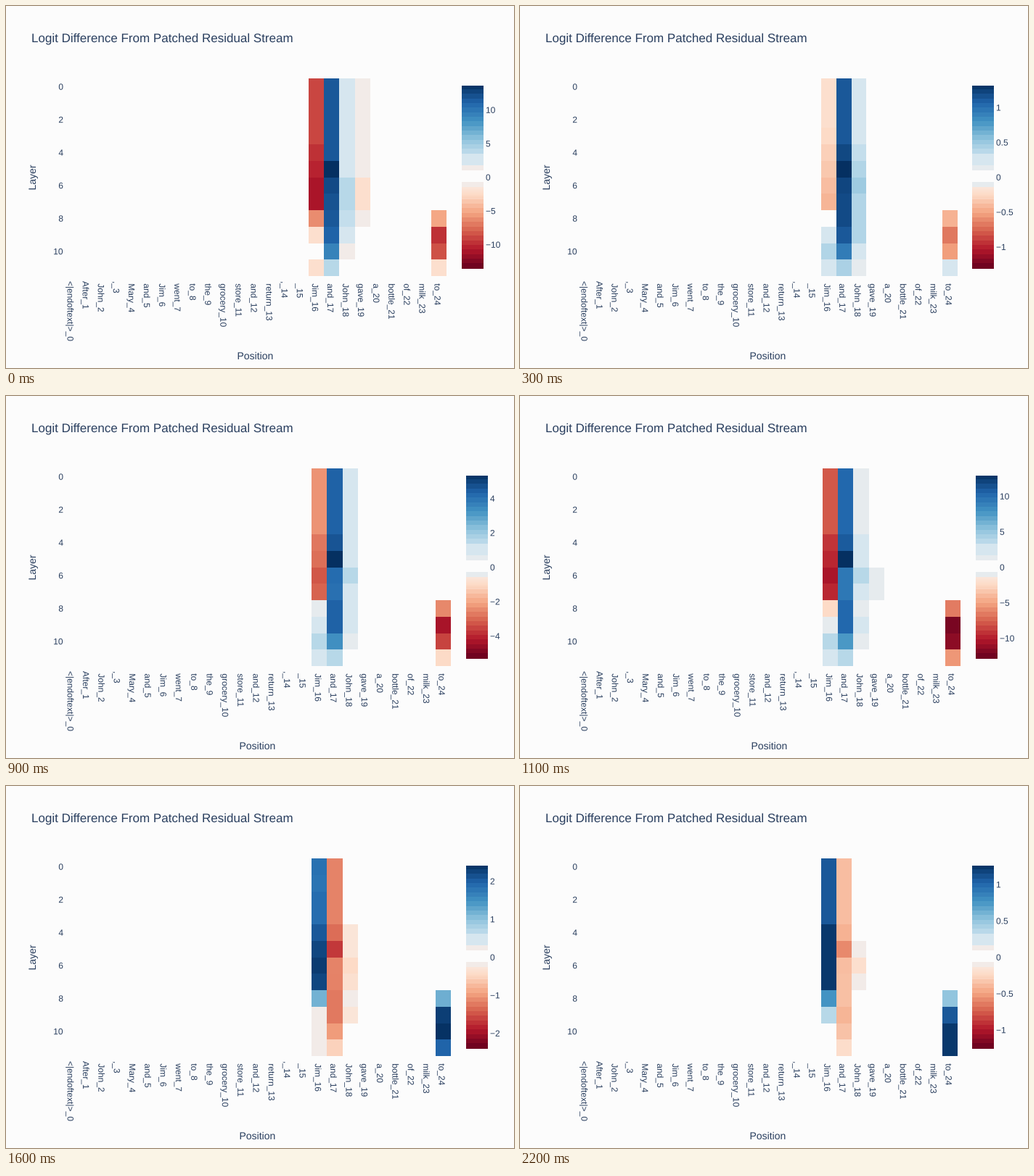
Write a matplotlib script that moves like this. It is 700 px wide and 500 px high and loops after 2.3 s.

```python
import math

import numpy as np
import matplotlib.pyplot as plt
from matplotlib.animation import FuncAnimation
from matplotlib.colors import LinearSegmentedColormap
from matplotlib.patches import PathPatch
from matplotlib.textpath import TextPath
from matplotlib.transforms import Affine2D

W, H, DPI = 700, 500, 100
STEPS, INTERVAL = 23, 100
PAPER = np.array([252, 252, 252])
INK = "#2a3f5f"
PALE_BLUE = np.array([214, 230, 239])
PINKISH, GREYISH = (242, 235, 232), (230, 235, 238)
LEFT, TOP, BOTTOM = 80, 100, 373
BAR_TOP, BAR_BOTTOM = 110, 363
BAR_MID = (BAR_TOP + BAR_BOTTOM) / 2
ROW_H = (BOTTOM - TOP) / 12
COLS = (16, 17, 18, 19, 24)
TOKENS = ["<|endoftext|>", "After", " John", ",", " Mary", " and", " Jim",
          " went", " to", " the", " grocery", " store", " and", " return",
          ",", " ", " Jim", " and", " John", " gave", " a", " bottle",
          " of", " milk", " to"]

RDBU = LinearSegmentedColormap.from_list("rdbu", [
    "#67001f", "#b2182b", "#d6604d", "#f4a582", "#fddbc7", "#f7f7f7",
    "#d1e5f0", "#92c5de", "#4393c3", "#2166ac", "#053061"], N=1001)

poses = []


def pose(at, span, faint, jim, and_, john, to, gave=12 * [0]):
    """Key state: step, colour range, tint near zero, columns in -1..1."""
    grid = np.array([jim, and_, john, gave, 8 * [0] + to], float)
    poses.append((at, math.log(span), np.array(faint, float), grid))


pose(0, 13.6, PINKISH,
     jim=4 * [-.67] + [-.73, -.77, -.82, -.82, -.47, -.17, 0, -.17],
     and_=5 * [.85] + [1, .9, .87, .85, .81, .67, .28],
     john=6 * [.17] + [.28, .28, .24, .17, -.1, 0],
     gave=6 * [-.1] + [-.17, -.17, -.1, 0, 0, 0],
     to=[-.39, -.73, -.64, -.17])
pose(3, 1.314, GREYISH,
     jim=3 * [-.17] + [-.2, -.24, -.27, -.31, -.34, 0, .2, .3, .18],
     and_=4 * [.85] + [.91, 1, .92, .9, .9, .85, .7, .32],
     john=4 * [.18] + [.24, .3, .36, .3, .3, .3, .18, .1],
     to=[-.35, -.53, -.42, .18])
pose(6, 1.413, GREYISH,
     jim=4 * [-.2] + [-.25, -.25, -.33, -.33, .1, .17, .28, .1],
     and_=4 * [.85] + [.9, 1, .85, .8, .85, .85, .67, .28],
     john=6 * [.17] + [.28, .17, .17, .17, .1, 0],
     to=[-.43, -.64, -.35, .17])
pose(11, 12.9, GREYISH,
     jim=4 * [-.62] + [-.72, -.76, -.82, -.76, -.2, .1, .28, .17],
     and_=4 * [.79] + [.84, 1, .72, .72, .79, .79, .58, .28],
     john=4 * [.1] + [.17, .17, .28, .17, .1, .17, .1, 0],
     gave=6 * [0] + [.1, .1] + 4 * [0],
     to=[-.52, -.95, -.9, -.44])
pose(14, 3.547, PINKISH,
     jim=[.67, .67, .7, .7, .8, .85, .93, .85, .4, 0, -.15, -.15],
     and_=4 * [-.56] + [-.64, -.79, -.56, -.56, -.62, -.62, -.47, -.25],
     john=4 * [0] + [-.15, -.15, -.23, -.15, -.15, -.15, -.1, -.1],
     to=[.52, 1, 1, .72])
pose(18, 1.636, PINKISH,
     jim=[.83, .8, .83, .83, .9, .98, .98, .98, .55, .2, 0, 0],
     and_=4 * [-.43] + [-.48, -.63, -.43, -.44, -.43, -.43, -.38, -.21],
     john=4 * [0] + [-.1, -.1, -.17, -.17, 0, -.1, 0, 0],
     to=[.46, .89, .98, .89])
pose(22, 1.259, PINKISH,
     jim=4 * [.85] + 4 * [.97] + [.6, .28, 0, 0],
     and_=4 * [-.31] + [-.35, -.48, -.31, -.3, -.3, -.34, -.29, -.18],
     john=5 * [0] + [-.1, -.17, -.1] + 4 * [0],
     to=[.4, .85, .97, .97])


def state(step):
    """Blend the two key states around a step."""
    for a, b in zip(poses, poses[1:]):
        if step <= b[0]:
            u = (step - a[0]) / (b[0] - a[0])
            span, faint, grid = (p + (q - p) * u for p, q in zip(a[1:], b[1:]))
            return math.exp(span), faint, grid


def shade(t, faint):
    if abs(t) < .064:
        return PAPER
    if abs(t) < .12:
        return faint
    if 0 < t < .235:
        return PALE_BLUE
    return np.array(RDBU((t + 1) / 2)[:3]) * 255


def band(t):
    """Coarse steps of the colour bar."""
    if abs(t) < .235:
        return t
    return math.copysign(min(math.floor(abs(t) * 20) / 20 + .025, .985), t)


def tick_step(span):
    rough = 2 * span / 7.2
    base = 10 ** math.floor(math.log10(rough))
    return next(m * base for m in (1, 2, 5, 10) if rough <= m * base)


def px(v):
    return math.floor(v + .5)


def write(x, y, s, size=12, align=0, turn=0):
    path = TextPath((0, 0), s, size=size, prop={"family": "Liberation Sans"})
    box = path.get_extents()
    place = (Affine2D().translate(-align * (box.x0 + box.x1), 0)
             .scale(1, -1).rotate_deg(turn).translate(x, y))
    patch = PathPatch(place.transform_path(path), fc=INK, lw=0, snap=False)
    return ax.add_patch(patch)


fig = plt.figure(figsize=(W / DPI, H / DPI), dpi=DPI)
ax = fig.add_axes([0, 0, 1, 1])
ax.set_xlim(0, W)
ax.set_ylim(H, 0)
ax.axis("off")
canvas = ax.imshow(np.full((H, W, 3), 252, np.uint8), extent=(0, W, H, 0),
                   interpolation="nearest", aspect="auto")

write(35, 50, "Logit Difference From Patched Residual Stream", 17)
write(41, BAR_MID, "Layer", 14, .5, -90)
for row in range(0, 12, 2):
    write(79, TOP + (row + .5) * ROW_H + 4.3, str(row), align=1)
moving = []


def draw(step):
    while moving:
        moving.pop().remove()
    span, faint, grid = state(step)
    tick = tick_step(span)
    if tick < 1:
        right, bar = 603, 623
    elif span >= 10:
        right, bar = 607, 628
    else:
        right, bar = 613, 634
    col_w = (right - LEFT) / 25

    img = np.tile(PAPER.astype(np.uint8), (H, W, 1))
    for col, values in zip(COLS, grid):
        x0, x1 = px(LEFT + col * col_w), px(LEFT + (col + 1) * col_w)
        for row, t in enumerate(values):
            y0, y1 = px(TOP + row * ROW_H), px(TOP + (row + 1) * ROW_H)
            img[y0:y1, x0:x1] = shade(t, faint)
    for y in range(BAR_TOP, BAR_BOTTOM):
        t = (BAR_MID - 1.3 - y - .5) / (BAR_MID - BAR_TOP)
        img[y, bar:bar + 30] = shade(band(t), faint)
    canvas.set_data(img)

    for i, token in enumerate(TOKENS):
        x = LEFT + (i + .5) * col_w - 6
        moving.append(write(x, 380, f"{token}_{i}", turn=90))
    moving.append(write((LEFT + right) / 2, 488, "Position", 14, .5))
    count = math.floor(span / tick)
    for k in range(-count, count + 1):
        y = BAR_MID - k * tick / span * (BAR_MID - BAR_TOP) + 4.3
        label = f"{k * tick:g}".replace("-", "\u2212")
        moving.append(write(bar + 33, y, label))
    return [canvas, *moving]


anim = FuncAnimation(fig, draw, frames=STEPS, interval=INTERVAL,
                     init_func=lambda: draw(0), repeat=True, repeat_delay=0)
plt.show()
```
